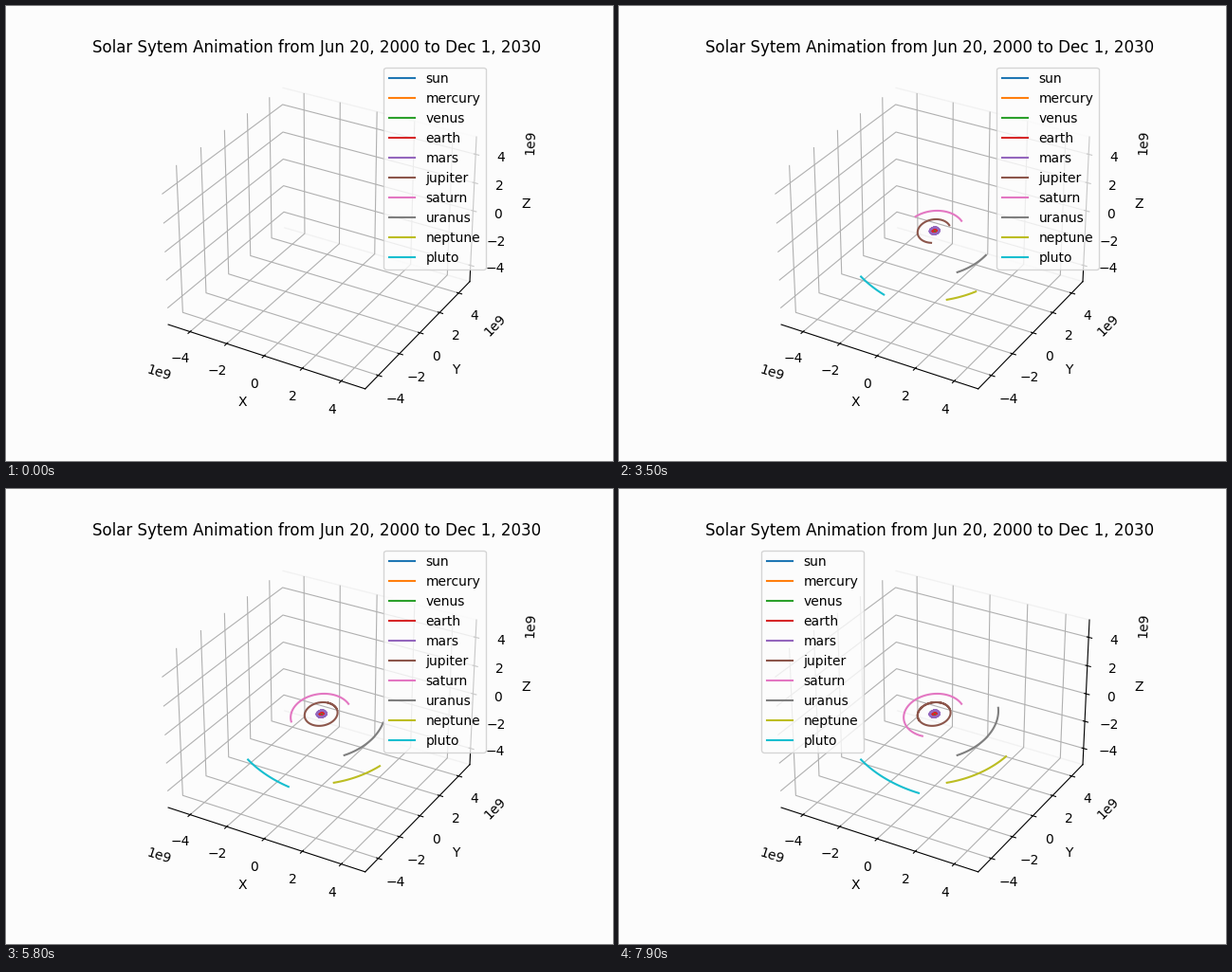
Write a matplotlib script that moves like this. It is 640x480 px and loops after 8 s.

```python
import numpy as np
import matplotlib.pyplot as plt
from matplotlib.animation import FuncAnimation

FRAMES = 80
INTERVAL = 100
STEP = 83.2          # days per frame
START = 170.5        # 20 June 2000, days after J2000
AU = 1.495978707e8   # km
TILT = np.radians(23.44)
LIMIT = 5e9 * 25 / 24
LEGEND_MOVE = 59
PAPER = "#fcfcfc"

days = START + STEP * np.arange(FRAMES)


def spin(u, v, angle):
    """Rotate the pair (u, v) by an angle in radians."""
    c, s = np.cos(angle), np.sin(angle)
    return u * c - v * s, u * s + v * c


def orbit(a, lon, e=0, peri=0, inc=0, node=0):
    """Equatorial path in km: axis in AU, angles in degrees at J2000."""
    lon, peri, inc, node = np.radians([lon, peri, inc, node])
    # Kepler's third law gives the mean motion
    mean = lon - peri + 2 * np.pi * days / (365.2564 * a ** 1.5)
    ecc = mean
    for _ in range(20):
        ecc = mean + e * np.sin(ecc)
    x = a * (np.cos(ecc) - e)
    y = a * np.sqrt(1 - e * e) * np.sin(ecc)

    x, y = spin(x, y, peri - node)
    y, z = spin(y, 0, inc)
    x, y = spin(x, y, node)
    y, z = spin(y, z, TILT)
    return AU * np.array([x, y, z])


jupiter = orbit(5.203, 34.4, e=0.0484, peri=14.7)
paths = {
    "sun": -jupiter / 1047,  # wobble about the barycentre
    "mercury": orbit(0.387, 252.3),
    "venus": orbit(0.7233, 182),
    "earth": orbit(1, 100.5),
    "mars": orbit(1.5237, 355.4, e=0.0934, peri=336.1),
    "jupiter": jupiter,
    "saturn": orbit(9.537, 49.95, e=0.0539, peri=92.6, inc=2.5, node=113.7),
    "uranus": orbit(19.19, 313.2, e=0.0473, peri=171),
    "neptune": orbit(30.07, 304.9, e=0.0086, peri=45, inc=1.8, node=131.8),
    "pluto": orbit(39.48, 238.9, e=0.2488, peri=224.1, inc=17.1, node=110.3),
}

plt.rcParams["axes.facecolor"] = PAPER
fig = plt.figure(figsize=(6.4, 4.8), dpi=100, facecolor=PAPER)
ax = fig.add_subplot(projection="3d")
span = (-LIMIT, LIMIT)
ax.set(xlim=span, ylim=span, zlim=span, xlabel="X", ylabel="Y", zlabel="Z")
ax.set_title("Solar Sytem Animation from Jun 20, 2000 to Dec 1, 2030")

ax.xaxis.pane.set_visible(False)
ax.zaxis.pane.set_visible(False)
ax.yaxis.pane.set_fill(False)
ax.yaxis.pane.set_edgecolor("#e8e8e8")

lines = [ax.plot([], [], [], label=name)[0] for name in paths]
legend = ax.legend(loc="upper right")


def update(frame):
    # a trail needs two points before it shows
    count = frame + 1 if frame else 0
    for line, path in zip(lines, paths.values()):
        line.set_data_3d(*path[:, :count])
    legend.set_loc("upper right" if frame < LEGEND_MOVE else "upper left")
    return lines


anim = FuncAnimation(fig, update, frames=FRAMES, interval=INTERVAL,
                     init_func=lambda: update(0), repeat=True, repeat_delay=0)
plt.show()
```
